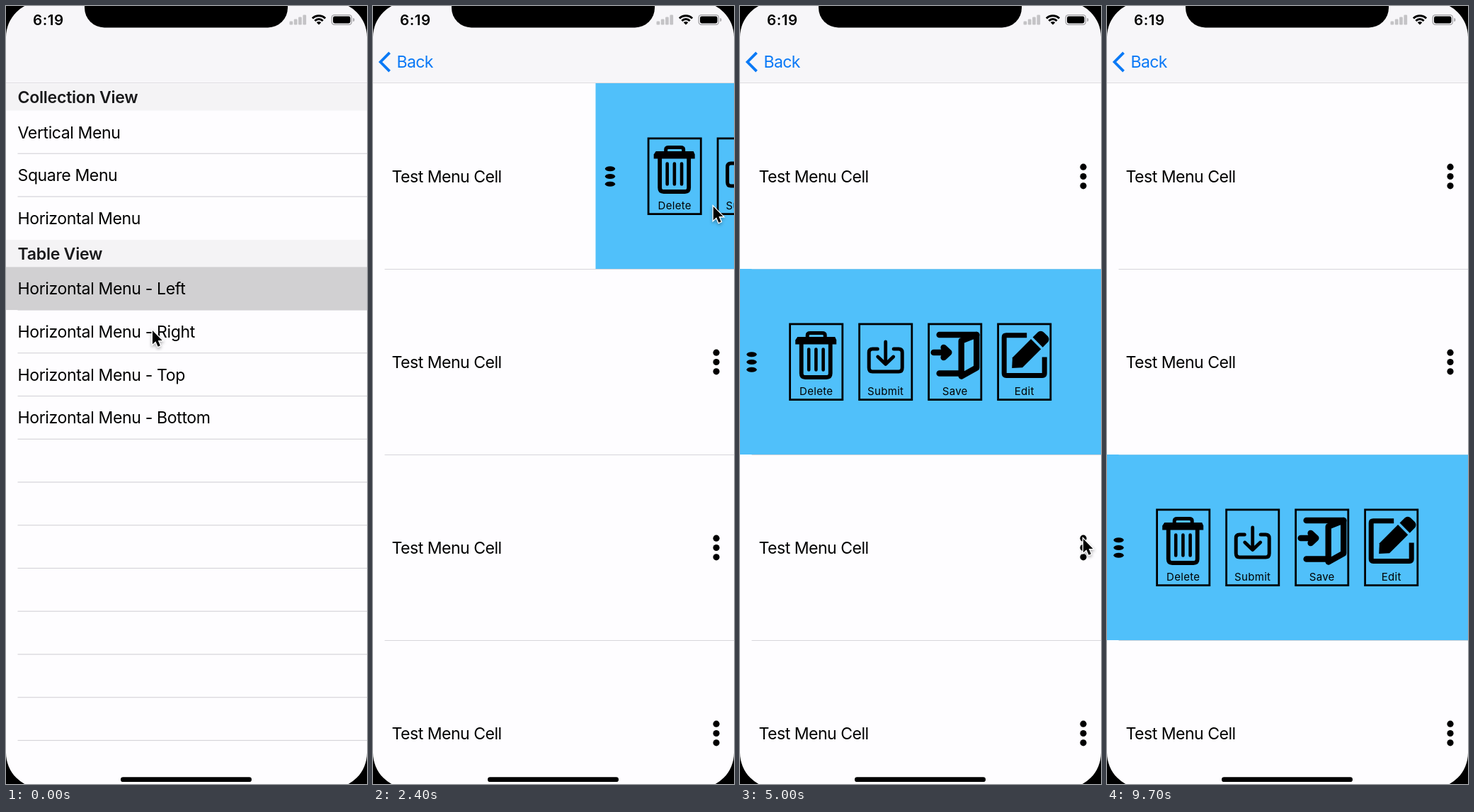
These frames come from a looping animation (510 px wide and 1098 px high, 9800 ms). An HTML page with a canvas:

```html
<!DOCTYPE html>
<html lang="en">
<head>
<meta charset="utf-8">
<title>Sliding cell menu</title>
<style>
html, body { margin: 0; width: 100%; height: 100%; overflow: hidden; background: #000; }
canvas { display: block; }
</style>
</head>
<body>
<canvas id="stage" width="510" height="1098"></canvas>
<script>
const W = 510, H = 1098, LOOP = 9800, STEP = 100;
const NAV = 109, ROW = 262, PITCH = 60.75;
const PAPER = '#fefdff', BLUE = '#50c0fa', LINE = '#d6d5da', LINK = '#0a79f6';
const ctx = document.getElementById('stage').getContext('2d');

const clamp = v => Math.max(0, Math.min(1, v));
const easeInOut = v => (v = clamp(v)) < .5 ? 2 * v * v : 1 - 2 * (1 - v) ** 2;
const easeOut = v => 1 - (1 - clamp(v)) ** 3;

// Opening and closing times of the menu in each cell
const menus = [[2050, 3600], [3600, 5100], [5100, Infinity]];
const slide = (t, start) => easeInOut((t - start) / 800);

// Pointer path: time, x, y
const pointer = [
  [0, 207, 458], [600, 207, 458], [1150, 440, 292], [1500, 483, 232],
  [2200, 483, 232], [2800, 473, 462], [3100, 484, 487], [3400, 485, 490],
  [4200, 485, 490], [4900, 485, 752], [5650, 485, 752], [6050, 526, 740]
];

function rect(x, y, w, h, color) {
  ctx.fillStyle = color;
  ctx.fillRect(x, y, w, h);
}

function pill(x, y, w, h, r, color = '#000') {
  ctx.fillStyle = color;
  ctx.beginPath();
  ctx.roundRect(x, y, w, h, r);
  ctx.fill();
}

function oval(x, y, rx, ry) {
  ctx.fillStyle = '#000';
  ctx.beginPath();
  ctx.ellipse(x, y, rx, ry, 0, 0, 7);
  ctx.fill();
}

function text(s, x, y, { size = 23.1, weight = 400, space = -.42, color = '#000', align = 'left' } = {}) {
  ctx.font = `${weight} ${size}px Inter, sans-serif`;
  ctx.letterSpacing = space + 'px';
  ctx.textAlign = align;
  ctx.fillStyle = color;
  ctx.fillText(s, x, y);
}

function stroke(d, width, color = '#000') {
  ctx.strokeStyle = color;
  ctx.lineWidth = width;
  ctx.stroke(new Path2D(d));
}

function fill(d, color = '#000') {
  ctx.fillStyle = color;
  ctx.fill(new Path2D(d));
}

function at(x, y, draw) {
  ctx.save();
  ctx.translate(x, y);
  draw();
  ctx.restore();
}

// Icons are drawn from the top left corner of their button
const buttons = {
  Delete() {
    stroke('M26 20V17Q26 14 30 14H47Q51 14 51 17V20', 5);
    fill('M12 19.5H65L67 24V30H9V24Z');
    stroke('M17.5 27V71Q17.5 76.5 23 76.5H53Q58.5 76.5 58.5 71V27', 5.8);
    stroke('M28 37V66M38.2 37V66M48.4 37V66', 4.6);
  },
  Submit() {
    stroke('M27 36.5H20Q15 36.5 15 41.5V63Q15 68.5 20 68.5H57Q62 68.5 62 63V41.5Q62 36.5 57 36.5H50', 5);
    stroke('M38.5 26.5V57M27.5 47.5L38.5 58L49.5 47.5', 4.8);
  },
  Save() {
    stroke('M16.5 16.5H69M16.5 71H46', 8.6);
    stroke('M47.5 25L69 16.5V63L47.5 75Z', 8.4);
    stroke('M8.5 41.5H29M22.5 34.5L30 41.5L22.5 48.5', 8.6);
  },
  Edit() {
    ctx.lineCap = 'butt';
    stroke('M42 17.2H13Q10 17.2 10 20V71Q10 74 13 74H64Q67 74 67 71V48', 7);
    at(21, 63.5, () => {
      ctx.rotate(-Math.PI / 4);
      fill('M0 0L11 -10H48V10H11Z');
      pill(51.5, -10, 16, 20, [0, 6, 6, 0]);
    });
  }
};

function drawMenu(x, y) {
  rect(x, y, W - x + 4, ROW, BLUE);
  for (const d of [-10.7, 0, 10.7]) oval(x + 20.5, y + 131.5 + d, 7.2, 3.5);
  Object.entries(buttons).forEach(([label, icon], i) => at(x + 73.2 + i * 98, y + 76.5, () => {
    ctx.strokeStyle = '#000';
    ctx.lineWidth = 2.8;
    ctx.strokeRect(1.4, 1.4, 74.2, 106.7);
    ctx.lineCap = ctx.lineJoin = 'round';
    icon();
    text(label, 38.5, 101.5, { size: 15, space: .3, align: 'center' });
  }));
}

function drawCells(t) {
  rect(0, NAV, W, H - NAV, PAPER);
  for (let i = 0; i < 4; i++) {
    const y = NAV + i * ROW;
    text('Test Menu Cell', 26.5, y + 139.9, { space: -.52 });
    for (const d of [-13.3, 0, 13.3]) oval(485, y + 131.5 + d, 4.6, 4.6);
    rect(16.5, y + ROW, W, 1, LINE);
  }
  menus.forEach(([open, close], i) => {
    const x = 512 - 516 * (slide(t, open) - slide(t, close));
    const y = NAV + i * ROW;
    if (x >= W) return;
    drawMenu(x, y);
    if (i) rect(16.5, y, W, 1, 'rgba(214,213,218,.35)');
  });
}

function drawSection(title, y) {
  rect(0, y, W, 38, '#f4f3f5');
  text(title, 16.5, y + 27.8, { weight: 600, space: -.27, color: '#19191b' });
}

function drawList(t) {
  const selected = t < 300 ? 0 : 1;
  rect(0, NAV, W, H - NAV, PAPER);
  drawSection('Collection View', 109.5);
  ['Vertical', 'Square', 'Horizontal'].forEach((name, i) => {
    const y = 147.5 + i * PITCH;
    text(name + ' Menu', 16.5, y + 39);
    if (i < 2) rect(16.5, y + PITCH - .6, W, 1.2, LINE);
  });
  drawSection('Table View', 330);
  for (let i = 0; i < 11; i++) rect(16.5, 428.4 + i * PITCH, W, 1.2, LINE);
  rect(0, 368.3 + selected * PITCH, W, PITCH, '#d1d0d2');
  ['Left', 'Right', 'Top', 'Bottom'].forEach((side, i) =>
    text('Horizontal Menu - ' + side, 16.5, 407.2 + i * PITCH, { space: -.38 }));
}

function drawNav(p) {
  rect(0, 0, W, NAV, '#f7f6f9');
  rect(0, NAV - .5, W, 1, '#c5c4c8');
  ctx.globalAlpha = p;
  ctx.lineCap = 'butt';
  ctx.lineJoin = 'miter';
  stroke('M23.5 65.8L10.5 79L23.5 92.2', 3.8, LINK);
  text('Back', 33.5 + 190 * (1 - p), 87.3, { color: LINK, space: -.7 });
  ctx.globalAlpha = 1;
}

function drawStatus() {
  text('6:19', 38, 26.8, { size: 20.6, weight: 600, space: .5 });
  [5, 8, 11, 14].forEach((h, i) => pill(400.5 + i * 6.3, 26.5 - h, 4.7, h, 1.2, '#c4c3c6'));
  at(442, 26.6, () => {
    const a = -Math.PI * .75, b = -Math.PI * .25;
    ctx.lineCap = 'butt';
    ctx.strokeStyle = ctx.fillStyle = '#000';
    ctx.lineWidth = 3;
    for (const r of [8, 12.8]) {
      ctx.beginPath();
      ctx.arc(0, 0, r, a, b);
      ctx.stroke();
    }
    ctx.beginPath();
    ctx.moveTo(0, 0);
    ctx.arc(0, 0, 4.6, a, b);
    ctx.fill();
  });
  pill(459.5, 12, 29.5, 15, 4.5, '#a3a2a5');
  pill(460.8, 13.3, 26.9, 12.4, 3.4, '#f7f6f9');
  pill(462, 14.5, 24.5, 10, 2.4);
  pill(490.3, 17, 2, 5, [0, 2, 2, 0], '#a3a2a5');
}

function drawBezel() {
  pill(162, 1088.3, 185, 6.8, 3.4);
  pill(111, -40, 287, 70.5, 28);
  ctx.beginPath();
  ctx.rect(-1, -10, W + 2, H + 20);
  ctx.roundRect(0, -6, W, H + 12, 50);
  ctx.fill('evenodd');
}

function drawPointer(t) {
  const i = pointer.findIndex(k => k[0] > t);
  if (i < 0) return;
  const [t0, x0, y0] = pointer[i - 1], [t1, x1, y1] = pointer[i];
  const p = easeInOut((t - t0) / (t1 - t0));
  const arrow = 'M0 0V19.2L4.4 15.2L7.7 22.7L10.9 21.3L7.7 14H13.7Z';
  at(x0 + (x1 - x0) * p, y0 + (y1 - y0) * p, () => {
    ctx.lineJoin = 'miter';
    ctx.shadowColor = 'rgba(0,0,0,.35)';
    ctx.shadowBlur = 4;
    ctx.shadowOffsetY = 2;
    stroke(arrow, 2.6, '#fff');
    ctx.shadowColor = 'transparent';
    fill(arrow);
  });
}

function frame(now) {
  const t = Math.floor(now % LOOP / STEP) * STEP;
  const push = easeOut((t - 400) / 500);
  drawNav(push);
  if (push < 1) {
    at(-W * .3 * push, 0, () => drawList(t));
    rect(0, NAV, W, H, `rgba(0,0,0,${.1 * push})`);
  }
  if (push > 0) at(W * (1 - push), 0, () => drawCells(t));
  drawStatus();
  drawPointer(t);
  drawBezel();
  requestAnimationFrame(frame);
}
requestAnimationFrame(frame);
</script>
</body>
</html>
```
